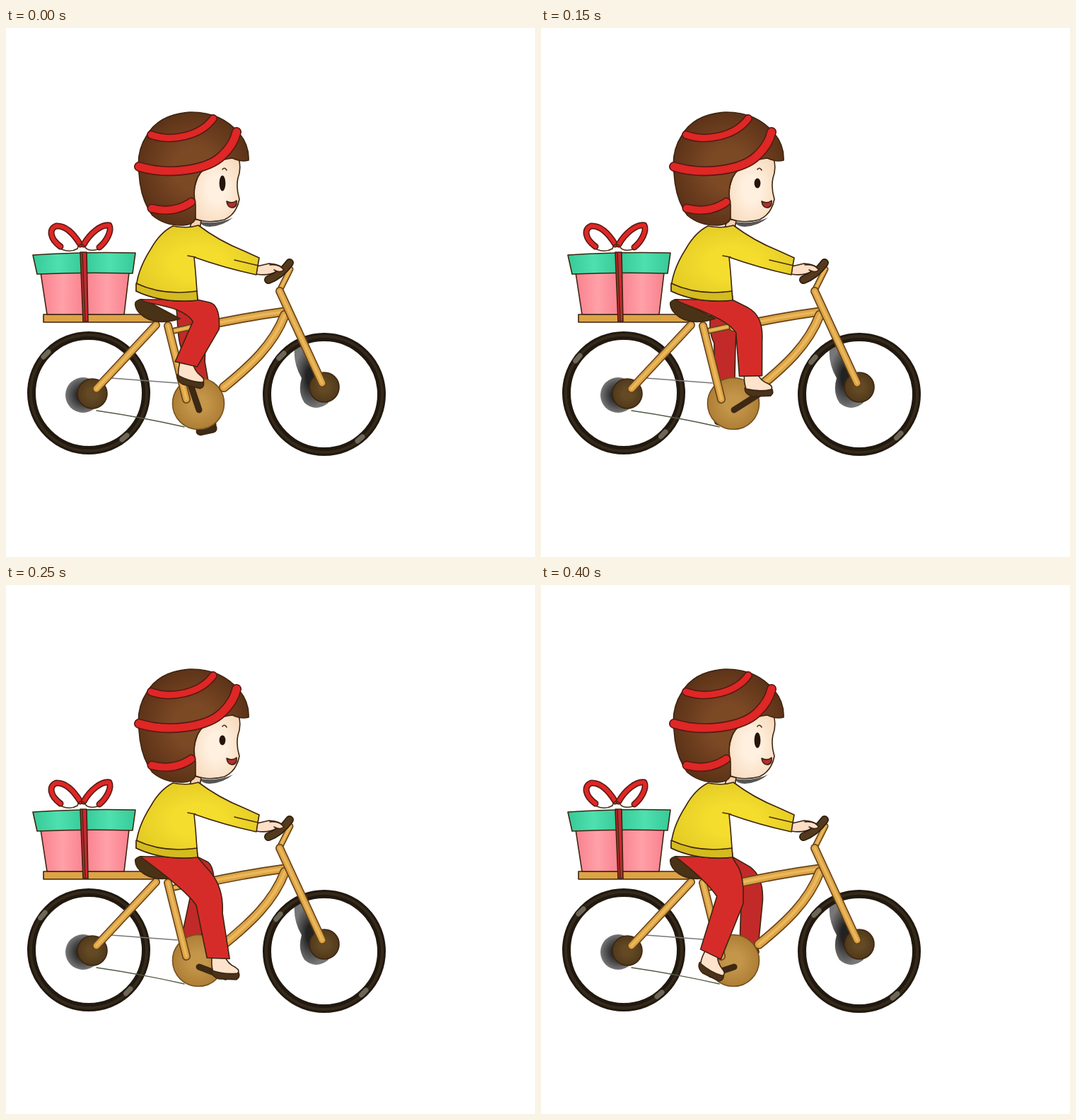
Animation of 748 by 748 pixels, one loop 0.45 s. Source, as an HTML page:

```html
<!DOCTYPE html>
<html lang="en">
<head>
<meta charset="utf-8">
<title>Gift ride</title>
<style>
  html, body { margin: 0; height: 100%; overflow: hidden; background: #fff; }
  svg { display: block; width: 100vw; height: 100vh; stroke-linecap: round; stroke-linejoin: round; }
  .ink { stroke: #3d2410; stroke-width: 1.6; }
  .line { fill: none; stroke: #4a2c10; stroke-width: 1.6; }
</style>
</head>
<body>
<svg id="stage" viewBox="0 0 748 748"></svg>
<script>
const STEP = 50, STEPS = 9;
const CRANK = { x: 276, y: 534, radius: 38 };

const shape = (d, fill) => `<path class="ink" d="${d}" fill="${fill}"/>`;
const line = d => `<path class="line" d="${d}"/>`;
const stroke = (d, color, width) =>
  `<path d="${d}" fill="none" stroke="${color}" stroke-width="${width}"/>`;
const tube = (d, width, color, edge) => stroke(d, edge, width) + stroke(d, color, width - 3.2);
const wood = (d, width) => tube(d, width, '#dda345', '#65431a') + stroke(d, '#eab95c', width * .28);
const ribbon = (d, width) => tube(d, width, '#df2725', '#571915');
const radial = (id, inner, outer, size = .5) => `<radialGradient id="${id}" r="${size}">
  <stop offset=".3" stop-color="${inner}"/><stop offset="1" stop-color="${outer}"/></radialGradient>`;
const sheen = (id, dark, light) => `<linearGradient id="${id}">${[dark, light, dark, light, dark].map(
  (color, i) => `<stop offset="${i / 4}" stop-color="${color}"/>`).join('')}</linearGradient>`;

const wheel = (x, y) => `<g transform="translate(${x} ${y})" fill="none">
  <circle r="81" stroke="#21190f" stroke-width="12"/>
  <circle r="82" stroke="#35291a" stroke-width="4"/>
  <path class="glint" d="M-64-51L-57-58M47 66L54 60" stroke="#6d6758" stroke-width="7"/></g>`;
const hub = (x, y) => `<circle class="ink" cx="${x}" cy="${y}" r="21" fill="url(#hub)"/>`;

document.getElementById('stage').innerHTML = `
<defs>
  ${radial('hub', '#644a24', '#50391b')}
  ${radial('disc', '#c4964a', '#ad7e34')}
  ${radial('helmet', '#7c4925', '#542d14', .6)}
  ${radial('skin', '#fff0df', '#f7d8ba', .65)}
  ${radial('shirt', '#f4dd2d', '#dbc222', .7)}
  ${radial('shadow', '#222', '#777')}
  ${sheen('pink', '#f8818e', '#ffa0a8')}
  ${sheen('green', '#36c997', '#4fe0af')}
</defs>
<circle cx="109" cy="519" r="25" fill="url(#shadow)"/>
<path d="M408 452Q420 446 426 458L450 500L456 530Q438 544 422 530Q412 515 418 495Q406 475 408 452Z" fill="url(#shadow)"/>
${wheel(117, 516)}${wheel(450, 518)}
${hub(122, 517)}${hub(450, 508)}
${stroke('M148 495L242 502', '#777', 1.6)}
${stroke('M128 541Q190 550 252 564', '#4f5b43', 1.4)}
<path id="farLeg" class="ink" fill="#c12a28"/>
<path id="farPedal" class="ink" d="M-14-3Q0-6 14-4Q16 4 9 5L-10 5Q-16 3-14-3Z" fill="#3d2b15"/>
<circle cx="272" cy="531" r="36.5" fill="url(#disc)" stroke="#75501e" stroke-width="1.6"/>
${shape('M53 405H215V416H53Z', '#dda345')}
${wood('M238 428L266 422', 9)}
${wood('M272 423Q335 409 394 401', 13)}
${wood('M394 406C378 448 345 478 308 508', 14)}
${wood('M229 421L255 525', 12)}
${wood('M212 420L128 510', 12)}
${wood('M402 341L386 373', 9)}
${wood('M387 372L447 502', 12)}
${shape('M183 388Q190 380 201 387L246 411Q216 421 196 409Q181 399 183 388Z', '#4a3217')}
<path id="crank" stroke="#3d2914" stroke-width="9"/>
<g id="foot">
  ${shape('M-20-5Q0 0 18-4Q22 3 16 7L-9 7Q-20 4-20-5Z', '#49331a')}
  ${shape('M-20-26L-2-26Q2-15 14-10Q21-6 17-2Q0 1-18-4Q-21-12-20-26Z', '#fde3cc')}
</g>
<path id="nearLeg" class="ink" fill="#d62c29"/>

${shape('M49 346H174L167 405H58Z', 'url(#pink)')}
${shape('M38 321Q110 316 183 318L179 347Q110 345 44 348Z', 'url(#green)')}
${shape('M105 317L114 317L116 415L109 415Z', '#c92831')}
${line('M108 318L112 414')}
${ribbon('M77 309C62 298 60 284 71 280C85 279 97 293 105 306', 9)}
${ribbon('M110 306C119 290 135 277 146 279C150 287 142 302 132 310', 9)}
${line('M79 313Q91 318 101 312Q104 302 111 308Q114 317 130 313')}

<path d="M274 274Q300 278 321 268Q307 280 288 281Q277 281 274 274Z" fill="#555"/>
${shape('M264 270L276 272L274 284L260 282Z', '#f6d3b4')}
${shape('M355 337L372 333Q389 334 396 343Q390 349 384 344Q371 351 354 348Z', '#fddfc8')}
${tube('M371 356Q388 350 401 332', 12, '#543a1d', '#2c1c0c')}
${shape('M373 335Q386 333 393 342Q387 347 379 342', '#fddfc8')}
${shape('M236 280Q256 284 272 279Q301 301 336 315L358 325L356 336L354 349Q308 339 266 324L268 345L271 385Q222 390 184 372Q184 345 205 312Q218 289 236 280Z', 'url(#shirt)')}
${shape('M184 361Q222 379 270 372L271 385Q222 390 184 372Z', '#d4bb20')}
${line('M257 322L268 324M323 328L357 336')}

${shape('M275 203Q259 232 268 270Q286 277 309 271Q326 263 330 242Q325 226 328 212Q333 199 329 184L300 182Z', 'url(#skin)')}
<ellipse id="eye" cx="306" cy="219.5" rx="4.4" fill="#26150b"/>
${line('M306 200Q309 196 312 201')}
${shape('M312 245Q320 249 326 244Q327 254 319 254Q313 253 312 245Z', '#b62d30')}
${shape('M343 187Q344 166 330 149Q304 118 260 119Q216 122 199 152Q184 175 188 205Q190 242 207 265Q225 280 250 279Q267 278 268 268L268 250Q262 222 275 205Q292 187 320 184Q333 190 343 187Z', 'url(#helmet)')}
${ribbon('M205 151C232 161 274 154 293 128', 12)}
${ribbon('M188 196C230 209 285 201 306 180Q322 165 326 147', 14)}
${ribbon('M206 255Q238 263 262 246', 13)}`;

const part = id => document.getElementById(id);
const set = (id, attributes) => {
  for (const name in attributes) part(id).setAttribute(name, attributes[name]);
};

// The knee follows the pedal offset (dx, dy); lag is how far it swings sideways.
function legPath(hip, dx, dy, lag, ankle, tilt, half) {
  const kneeX = 281 + .3 * dx - lag * dy, kneeY = 431 + .6 * dy + .15 * dx;
  const cuffX = half * Math.cos(tilt), cuffY = half * Math.sin(tilt);
  const knee = (x, y) => `${kneeX + x * half / 16} ${kneeY + y}`;
  const thighX = (kneeX + 292) / 2, thighY = (kneeY + 368) / 2;
  return `M${hip} 384C${hip + 10} 392 ${knee(-35, -17)} ${knee(-19, 7)}
    L${ankle.x - cuffX} ${ankle.y - cuffY}L${ankle.x + cuffX} ${ankle.y + cuffY}
    L${knee(18, 18)}Q${knee(20, -16)} ${thighX} ${thighY}L270 384Z`;
}

function draw(i) {
  // One turn per loop: slow at the front, quick over the back.
  const u = i / STEPS;
  const angle = (-114 + 360 * (.68 * u + .32 * u ** 6)) * Math.PI / 180;
  const dx = CRANK.radius * Math.cos(angle), dy = CRANK.radius * Math.sin(angle);
  const x = CRANK.x + dx, y = CRANK.y + dy;
  const farX = CRANK.x - dx / 2, farY = CRANK.y - dy;

  const degrees = 12 - 14 * Math.cos(angle + .35), tilt = degrees * Math.PI / 180;
  const ankle = {
    x: x - 11 * Math.cos(tilt) + 22 * Math.sin(tilt),
    y: y - 11 * Math.sin(tilt) - 22 * Math.cos(tilt)
  };
  set('nearLeg', { d: legPath(190, dx, dy, .2, ankle, tilt, 16) });
  set('farLeg', { d: legPath(236, -dx, -dy, .55, { x: farX, y: farY - 8 }, 0, 13) });
  set('foot', { transform: `translate(${x} ${y}) rotate(${degrees})` });
  set('farPedal', { transform: `translate(${farX} ${farY}) rotate(-12)` });
  set('crank', { d: `M${x} ${y + 4}L273 540` });

  const blinking = i > 2 && i < 6;
  set('eye', { ry: blinking ? 7 : 11 });
  document.querySelectorAll('.glint').forEach(
    glint => glint.setAttribute('transform', `rotate(${blinking ? -5 : 0})`));
}

function tick() {
  draw(Math.floor(performance.now() / STEP) % STEPS);
  requestAnimationFrame(tick);
}
tick();
</script>
</body>
</html>
```
